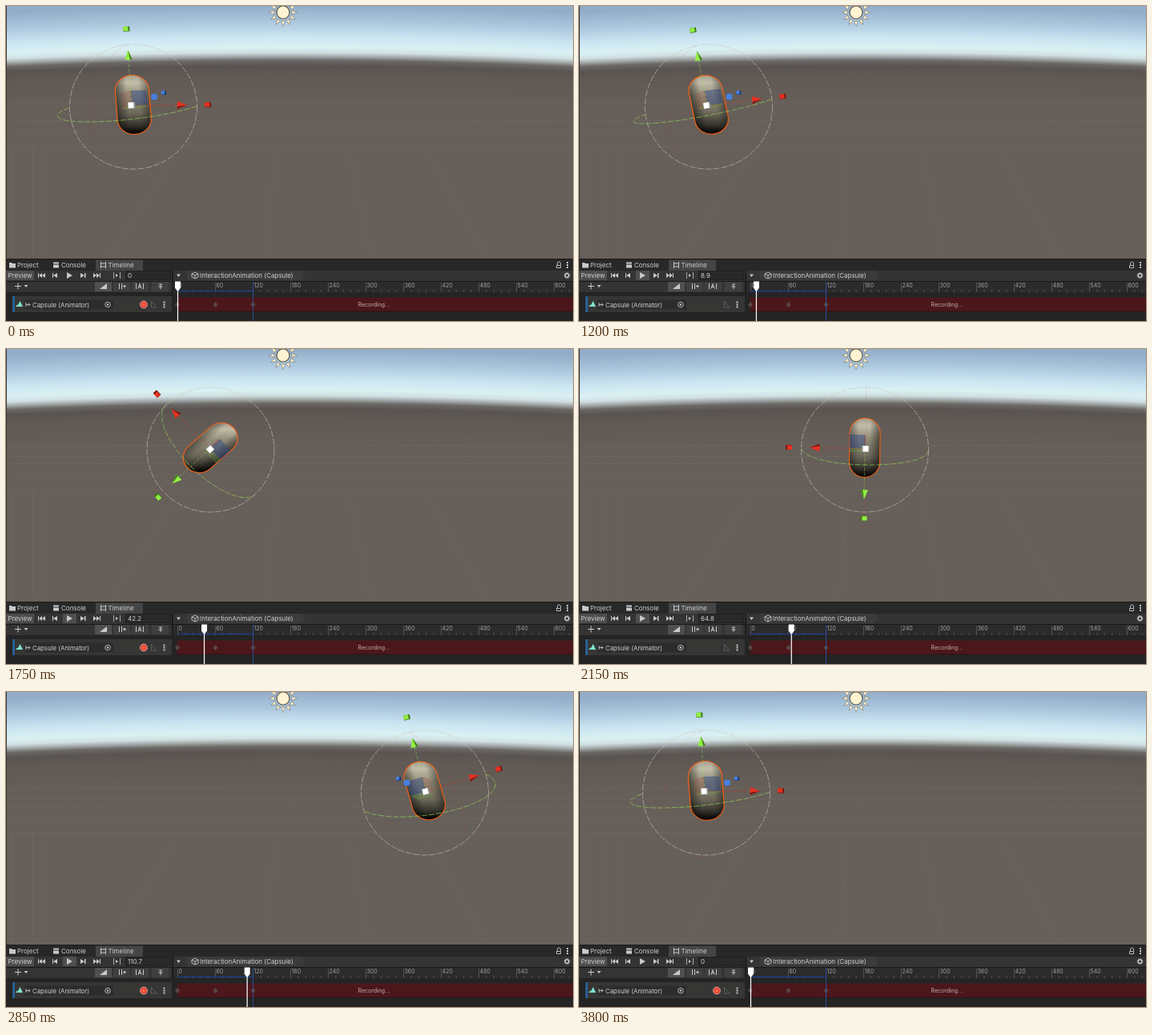
Recreate the animation shown at these times as an HTML page. Size 708 by 394 pixels, loop 4.1 s.

```html
<!DOCTYPE html>
<html lang="en">
<head>
<meta charset="utf-8">
<title>Capsule timeline</title>
<style>
html, body { margin: 0; width: 100%; height: 100%; overflow: hidden; background: #222; }
svg { display: block; width: 708px; height: 394px; }
text { font: 8px Inter, "Liberation Sans", sans-serif; fill: #d0d0d0; }
.small { font-size: 7px; fill: #a0a0a0; }
.icon { fill: #c8c8c8; }
.line { fill: none; stroke: #c8c8c8; }
</style>
</head>
<body>
<svg viewBox="0 0 708 394">
  <defs>
    <radialGradient id="sky" gradientUnits="userSpaceOnUse" cx="354" cy="7866" r="7866" fr="7700">
      <stop offset="0" stop-color="#675f59"/>
      <stop offset=".3" stop-color="#665e58"/>
      <stop offset=".48" stop-color="#605954"/>
      <stop offset=".55" stop-color="#5a5451"/>
      <stop offset=".59" stop-color="#6b6866"/>
      <stop offset=".62" stop-color="#a3a9a9"/>
      <stop offset=".65" stop-color="#d0e0e1"/>
      <stop offset=".69" stop-color="#daf0f3"/>
      <stop offset=".77" stop-color="#cbe5f1"/>
      <stop offset=".88" stop-color="#abc7de"/>
      <stop offset="1" stop-color="#93adc8"/>
    </radialGradient>
    <linearGradient id="edge">
      <stop stop-opacity=".5"/><stop offset=".35" stop-opacity="0"/>
      <stop offset=".7" stop-opacity="0"/><stop offset="1" stop-opacity=".4"/>
    </linearGradient>
  </defs>

  <rect width="708" height="317" fill="url(#sky)"/>
  <path stroke="#8a817a" stroke-opacity=".22" stroke-width=".6" fill="none"
    d="M0 120.5H708M0 134.5H708M0 143.5H708M0 157.5H708M0 176.5H708M8.5 178V313M33.5 172V313M50.5 190V313M210 190L130 313M335 190L325 313M430 190L455 313M530 190L600 313"/>
  <path d="M.5 0V316" stroke="#3a3836"/>
  <g id="sun" transform="translate(346 8)"></g>
  <g id="scene"></g>

  <!-- tabs -->
  <rect y="316" width="708" height="78" fill="#191919"/>
  <rect y="317" width="708" height="14" fill="#282828"/>
  <rect x="112" y="317.5" width="59" height="13.5" fill="#454545"/>
  <path class="icon" d="M4 321h3l1 1h4v5.500H4z M59 320.500h7v2h-7z M59 323.500h7v4h-7z"/>
  <path class="line" d="M118.500 320v8M124.500 320v8M118 322h7M118 326h7"/>
  <text x="14" y="327">Project</text>
  <text x="69" y="327">Console</text>
  <text x="127.500" y="327">Timeline</text>
  <path class="line" d="M688.500 324v-2a2 2 0 0 1 4 0v2M687.500 324.500h5v3h-5z" stroke-width=".9"/>
  <path class="icon" d="M700 320h2v2h-2zM700 323h2v2h-2zM700 326h2v2h-2z"/>

  <!-- transport -->
  <rect y="331" width="708" height="13" fill="#343434"/>
  <rect y="331" width="35" height="12" fill="#4d4d4d"/>
  <rect id="pressed" x="71" y="331" width="17" height="12" fill="#4d4f50"/>
  <text x="2.500" y="340">Preview</text>
  <path class="icon" d="M40 334h1v6h-1z M45 334v6l-4-3z M49 334v6l-4-3z M58 334h1v6h-1z M64 334v6l-5-3z M76 333l7 4-7 4z M93 334v6l5-3z M98 334h1.500v6H98z M109 334v6l4-3z M113 334v6l4-3z M117 334h1v6h-1z M137 335v4l3-2z M213 335.500h5l-2.500 3.500z"/>
  <path class="line" d="M134.500 333v8M142.500 333v8" stroke-width=".8"/>
  <rect x="149.500" y="331.500" width="56" height="11" fill="#292929" stroke="#202020"/>
  <text id="count" x="152" y="340">0</text>
  <path d="M208 331V394" stroke="#1c1c1c" stroke-width="2"/>
  <path d="M226 331h143l5 6-5 6h-143z" fill="#3b3b3b"/>
  <path class="line" stroke-width=".9" d="M236 333l4 2v4l-4 2-4-2v-4zM232 335l4 2 4-2M236 337v4"/>
  <text x="242" y="340">InteractionAnimation (Capsule)</text>
  <circle class="line" cx="700.500" cy="337" r="2.300" stroke-width="1.400"/>
  <circle class="line" cx="700.500" cy="337" r="3.400" stroke-width="1" stroke-dasharray="1.300 1.370"/>

  <!-- edit bar -->
  <rect y="345" width="207" height="13" fill="#343434"/>
  <rect x="111" y="345" width="21" height="12" fill="#505050"/>
  <path d="M134 345h21v12h-21zM157 345h21v12h-21zM182 345h21v12h-21z" fill="#3f3f3f"/>
  <path class="line" d="M11 350.500h8M15 346.500v8M141.500 347v7M144.500 347v7M146 350.500h4M148 348.500v4M162.500 347v7M171.500 347v7M165 353.500l2-6 2 6M166 351.500h2M191 348h4M190.500 351h5M193 348v6"/>
  <path class="icon" d="M22.500 349h5l-2.500 3z M117 354l9-7v7z"/>

  <!-- ruler and track -->
  <rect x="209" y="345" width="499" height="13" fill="#2b2b2b"/>
  <path id="ticks" stroke="#666" stroke-width=".7"/>
  <g id="labels"></g>
  <rect y="358" width="708" height="36" fill="#242424"/>
  <path d="M214 356.500H308" stroke="#1f3a80" stroke-width="1.500"/>
  <rect x="8" y="363" width="199" height="20" fill="#363735"/>
  <rect x="8" y="363" width="3" height="20" fill="#285f96"/>
  <path d="M12 376l2.500-3v3zM14 376l3.500-7 3.500 7z" fill="#80e5d1"/>
  <rect x="23" y="367.500" width="111" height="12" fill="#2c2c2c"/>
  <path class="line" d="M25 371v5M25 373.500h5M28 371.500l2 2-2 2" stroke-width=".9"/>
  <text x="33" y="377" style="font-size:7.800px">Capsule (Animator)</text>
  <circle class="line" cx="127" cy="373.500" r="3.300" stroke-width=".9"/>
  <circle class="icon" cx="127" cy="373.500" r="1.200"/>
  <g id="record">
    <circle cx="172" cy="373.500" r="4.400" fill="#e44133" stroke="#e7a69b"/>
    <circle cx="172" cy="373.500" r="2" fill="#ff6850"/>
  </g>
  <path d="M181.500 369v8h7M182 370l5 6" fill="none" stroke="#666" stroke-width=".8"/>
  <path class="icon" d="M196.500 369.500h2v2h-2zM196.500 372.500h2v2h-2zM196.500 375.500h2v2h-2z"/>
  <rect x="214" y="364.500" width="494" height="17.500" fill="#4c171b"/>
  <path d="M214 382H708" stroke="#2f1012"/>
  <path d="M214 370l3 3.500-3 3.500-3-3.500zM261.500 370l3 3.500-3 3.500-3-3.500zM308.500 370l3 3.500-3 3.500-3-3.500z" fill="#594747"/>
  <text class="small" x="439.500" y="376" style="fill:#c3b0aa">Recording...</text>
  <path d="M308.500 345V394" stroke="#2f4f94"/>
  <g id="head" fill="#fff"><path d="M-3.500 344.500h7v8l-2.500 3.500h-2l-2.500-3.500z"/><path d="M-.6 355h1.200v39h-1.200z"/></g>
</svg>

<script>
const LOOP = 4100, STEP = 50;
const $ = id => document.getElementById(id);
const rad = Math.PI / 180;

// Playback clock: milliseconds against timeline position
const clock = [[1050, 0], [1200, 8.9], [1750, 42.2], [2150, 64.8], [2850, 110.7], [3000, 120]];
const END = 3050;

// Pose curves: screen x and the tilts of both handles
const KEYS = [0, 8.9, 42.2, 60, 64.8, 110.7, 120];
const POS = [159, 162, 255.5, 334, 357, 523, 530];
const UP = [4, 10.6, 133, 180, 179, 14.6, 5];
const SIDE = [0.6, 6.8, 134, 180, 179, 17.3, 9];
const BLINKS = [[350, 850], [1100, 1600], [2100, 2600], [3350, 3800]];

function position(ms) {
  if (ms < clock[0][0] || ms >= END) return 0;
  for (let i = 1; i < clock.length; i++) {
    const [a, u] = clock[i - 1], [b, v] = clock[i];
    if (ms <= b) return u + (v - u) * (ms - a) / (b - a);
  }
  return 120;
}

// Monotone cubic through the keys, flat at both ends
function curve(vals, x) {
  const slope = i => (vals[i + 1] - vals[i]) / (KEYS[i + 1] - KEYS[i]);
  const tangent = i => {
    if (i === 0 || i === KEYS.length - 1) return 0;
    const a = slope(i - 1), b = slope(i);
    return a * b > 0 ? 2 * a * b / (a + b) : 0;
  };
  let i = 0;
  while (i < KEYS.length - 2 && x > KEYS[i + 1]) i++;
  const w = KEYS[i + 1] - KEYS[i], u = (x - KEYS[i]) / w, v = 1 - u;
  return vals[i] * v * v * (1 + 2 * u) + vals[i + 1] * u * u * (3 - 2 * u)
    + w * u * v * (tangent(i) * v - tangent(i + 1) * u);
}

const scale = ([x, y], k) => [x * k, y * k];
const pts = list => list.map(p => p.map(n => n.toFixed(1)).join()).join(" ");

function quad(a, b, fill, alpha) {
  return `<polygon points="${pts([[0, 0], a, [a[0] + b[0], a[1] + b[1]], b])}" fill="${fill}"
    fill-opacity="${alpha}" stroke="${fill}" stroke-opacity=".6" stroke-width=".7"/>`;
}

function arc(a, b, color, alpha) {
  const list = [];
  for (let d = 0; d <= 180; d += 6) {
    const c = Math.cos(d * rad), s = Math.sin(d * rad);
    list.push([a[0] * c + b[0] * s, a[1] * c + b[1] * s]);
  }
  return `<polyline points="${pts(list)}" fill="none" stroke="${color}" stroke-opacity="${alpha}"
    stroke-width=".8" stroke-dasharray="7 2"/>`;
}

function cube(p, turn, fill, dark, w = 8, h = 6) {
  return `<g transform="translate(${p}) rotate(${turn})">
    <rect x="${-w / 2}" y="${-h / 2}" width="${w}" height="${h}" fill="${dark}"/>
    <rect x="${-w / 2}" y="${-h / 2}" width="${w - 2}" height="${h - 0.7}" fill="${fill}"/></g>`;
}

function handle(v, turn, cubeTurn, fill, dark) {
  return `<path d="M0 0L${scale(v, 0.6)}" stroke="${fill}" stroke-opacity=".55" stroke-width=".8" stroke-dasharray="4 2"/>
    <g transform="translate(${scale(v, 0.65)}) rotate(${turn})">
    <path d="M0-7L4.800 5H-4.800z" fill="${fill}"/><path d="M0-7L4.800 5H2z" fill="${dark}"/></g>`
    + cube(v, cubeTurn, fill, dark);
}

function capsule(x, stretch, tilt) {
  const s = Math.sin(tilt * rad), c = Math.cos(tilt * rad), half = 19.5 + 18 * Math.abs(c);
  const body = `<rect x="-19" y="-37" width="38" height="74" rx="19"`;
  return `<linearGradient id="shade" gradientUnits="userSpaceOnUse"
      x1="${half * s}" y1="${-half * c}" x2="${-half * s}" y2="${half * c}">
      <stop stop-color="#a39e8c"/><stop offset=".13" stop-color="#c2bda9"/>
      <stop offset=".35" stop-color="#918c79"/><stop offset=".64" stop-color="#6d695b"/>
      <stop offset=".84" stop-color="#35332c"/><stop offset=".95" stop-color="#0a0a09"/></linearGradient>
    <g transform="translate(${x} 123.500) scale(${stretch} 1) rotate(${-tilt})">
      ${body} fill="url(#shade)"/>${body} fill="url(#edge)" stroke="#f0601a" stroke-width="1.100"/></g>`;
}

function scene(T) {
  const x = curve(POS, T), up = curve(UP, T), side = curve(SIDE, T);
  const su = Math.sin(up * rad), cu = Math.cos(up * rad);
  const ss = Math.sin(side * rad), cs = Math.cos(side * rad);
  const off = x - 354;
  const green = scale([-su, -cu], 91.5 + 4.5 * cu), red = scale([cs, -ss], 95);
  const blue = [-off * 0.205, -16], near = [off * 0.27, 19];
  const u = scale(green, cu < 0 ? -0.19 : 0.19);
  const v = scale(red, (red[0] > 0) === (off < 0) ? 0.2 : -0.2);
  const depth = scale(near, 0.2);

  return `${capsule(x - 0.2, 1 + Math.abs(off) / 1800, up)}
    <ellipse cx="${x}" cy="126" rx="79.500" ry="78" fill="none" stroke="#c9c6c2" stroke-opacity=".75"
      stroke-width=".8" stroke-dasharray="8 2"/>
    <g transform="translate(${x} 126)">
      ${arc(scale([-su, -cu], 78), near, "#d04030", 0.18)}
      ${arc(scale([cs, -ss], 79), near, "#93d455", 0.85)}
    </g>
    <g transform="translate(${x + off * 0.01} 124.500)">
      ${quad(u, v, "#2c4584", 0.45)}${quad(u, depth, "#a85040", 0.2)}${quad(v, depth, "#6fae3c", 0.2)}
      ${Math.abs(blue[0]) > 27 ? `<circle cx="${blue[0] * 0.7}" cy="-11" r="4" fill="#477fe0"/>`
        + cube(blue, 0, "#477fe0", "#1c3a78", 6, 5) : ""}
      ${handle(red, 90 - side, -side, "#e53222", "#761710")}
      ${handle(green, -up, -up, "#92ec45", "#3d7a18")}
      ${cube([0, 0], -up, "#fff", "#8b8a86", 9, 8)}
    </g>`;
}

function setup() {
  let rays = "", ticks = "", labels = "";
  for (let d = 0; d < 360; d += 30)
    rays += `<path d="M-2.300 11L0 17.500L2.300 11z" transform="rotate(${d})" fill="#fff3d2" stroke="#6b6251" stroke-width=".5"/>`;
  $("sun").innerHTML = rays + '<circle r="8" fill="#fff3d2" stroke="#5f5748" stroke-width="1.200"/>';
  for (let i = 0; i <= 52; i++)
    ticks += `M${214.5 + i * 9.4} 358V${i % 5 ? 355 : 346}`;
  $("ticks").setAttribute("d", ticks);
  for (let i = 0; i <= 10; i++)
    labels += `<text class="small" x="${215.5 + i * 47}" y="352">${i * 60}</text>`;
  $("labels").innerHTML = labels;
}

const start = performance.now();
function draw() {
  const ms = Math.floor((performance.now() - start) % LOOP / STEP) * STEP;
  const T = position(ms);
  $("scene").innerHTML = scene(T);
  $("head").setAttribute("transform", `translate(${214.5 + T * 0.783} 0)`);
  $("count").textContent = +T.toFixed(1);
  $("pressed").style.opacity = +(ms >= 1050 && ms < END);
  $("record").style.opacity = +!BLINKS.some(([a, b]) => ms >= a && ms < b);
  requestAnimationFrame(draw);
}
setup();
draw();
</script>
</body>
</html>
```
